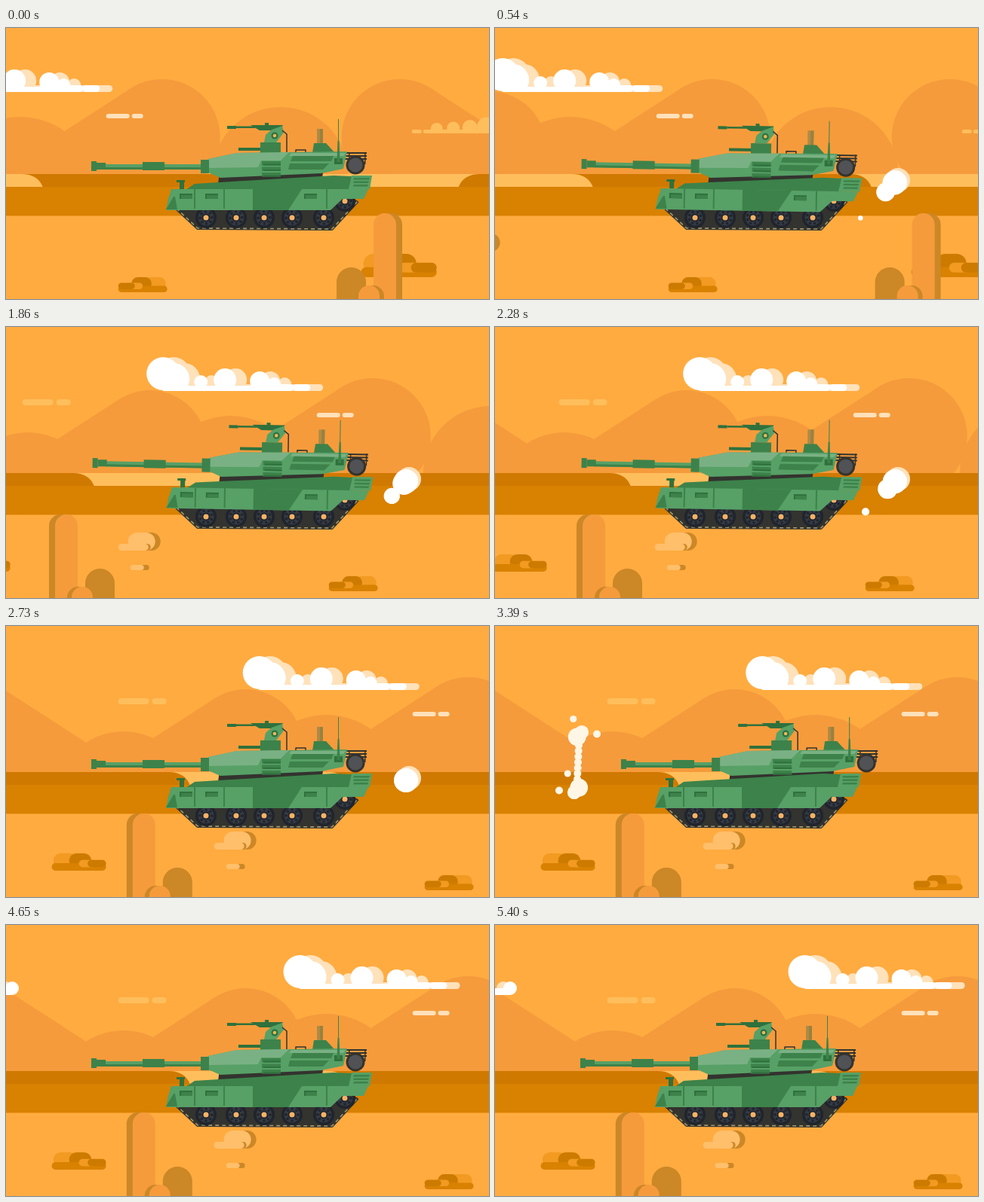
These frames come from a looping animation (640 px wide and 360 px high, 5.52 s). An HTML page with a canvas:

```html
<!DOCTYPE html>
<html lang="en">
<head>
<meta charset="utf-8">
<title>Desert tank</title>
<style>
html, body { margin: 0; width: 100%; height: 100%; overflow: hidden; background: #ffab40; }
canvas { display: block; width: 640px; height: 360px; }
</style>
</head>
<body>
<canvas id="stage" width="640" height="360"></canvas>
<script>
const ctx = document.getElementById('stage').getContext('2d');
const LOOP = 5520, STEP = 30, LAST = 5400, STOP = 2706;
const FIRST_SHOT = 3190, SHOT_GAP = 800, SHOTS = 3;

const C = {
  sky: '#ffab40', hill: '#f59b3c', band: '#d98100', strip: '#d07900', dune: '#ffbe5c',
  edge: '#cc8726', rock: '#f29a22', rockDark: '#cc7b00', rockBase: '#d98100', pale: '#ffbf6b',
  cream: '#ffe1ba', white: '#ffffff', smoke: '#fff6e6',
  light: '#7ab184', mid: '#57a066', green: '#3d824a', deep: '#2f713d',
  black: '#33332f', tyre: '#20242c', steel: '#353b44', hub: '#f4b266'
};

const clamp = v => Math.max(0, Math.min(1, v));
const smooth = v => { v = clamp(v); return v * v * (3 - 2 * v); };
const easeOut = v => 1 - Math.pow(1 - clamp(v), 3);

function circle(x, y, r, color) {
  if (r <= 0) return;
  ctx.fillStyle = color;
  ctx.beginPath();
  ctx.arc(x, y, r, 0, Math.PI * 2);
  ctx.fill();
}

function box(x, y, w, h, color) {
  ctx.fillStyle = color;
  ctx.fillRect(x, y, w, h);
}

function pill(x, y, w, h, color) {
  ctx.fillStyle = color;
  ctx.beginPath();
  ctx.roundRect(x, y, w, h, Math.min(w, h) / 2);
  ctx.fill();
}

function path(points) {
  ctx.beginPath();
  for (let i = 0; i < points.length; i += 2) ctx.lineTo(points[i], points[i + 1]);
}

function poly(color, ...points) {
  path(points);
  ctx.fillStyle = color;
  ctx.fill();
}

function line(color, width, ...points) {
  path(points);
  ctx.strokeStyle = color;
  ctx.lineWidth = width;
  ctx.stroke();
}

// Four-sided panel; the bottom corners lean sideways by l and r
function slab(color, x, y, w, h, l, r = l) {
  poly(color, x, y, x + w, y, x + w + r, y + h, x + l, y + h);
}

function shifted(dx, draw) {
  ctx.save();
  ctx.translate(dx, 0);
  draw();
  ctx.restore();
}

function clipAbove(y, draw) {
  ctx.save();
  ctx.beginPath();
  ctx.rect(-900, 0, 1800, y);
  ctx.clip();
  draw();
  ctx.restore();
}

// Round peak with one straight flank; side is -1 (left), 1 (right) or 0 (plain dome)
function hill(x, top, r, side) {
  circle(x, top + r, r, C.hill);
  if (!side) return;
  const a = 0.575, tx = x + side * r * Math.sin(a), ty = top + r * (1 - Math.cos(a));
  poly(C.hill, tx, ty, tx + side * (200 - ty) / Math.tan(a), 200, x, 200, x, top + r);
}

function hills() {
  hill(-457, 68, 77, 1);
  hill(-251, 140, 90, 0);
  hill(-89, 84, 75, -1);
  hill(18, 118, 100, 0);
  hill(206, 68, 77, -1);
  hill(363, 105, 90, 0);
  hill(521, 68, 77, 1);
}

// Flat mound with one rounded end at x, running away for w (negative: to the left)
function mound(x, w, color) {
  const s = Math.sign(w);
  ctx.fillStyle = color;
  ctx.beginPath();
  ctx.moveTo(x, 211);
  ctx.quadraticCurveTo(x + 7 * s, 194, x + 28 * s, 194);
  ctx.lineTo(x + w, 194);
  ctx.lineTo(x + w, 211);
  ctx.fill();
}

function dunes() {
  box(-700, 194, 1400, 55.5, C.band);
  box(-700, 194, 1400, 17, C.dune);
  mound(-163, -400, C.strip);
  mound(417, -400, C.strip);
  mound(48, -130, C.dune);
  mound(599, 200, C.strip);
}

function whiteCloud() {
  const puffs = [[100, 62, 22], [114, 69, 21], [150, 73, 9], [182, 70, 15], [228, 72, 13], [247, 76, 9]];
  pill(200, 76, 112, 9, C.cream);
  clipAbove(85, () => {
    for (const [x, y, r] of puffs) circle(x + 14, y, r, C.cream);
    for (const [x, y, r] of puffs) circle(x, y, r, C.white);
    box(100, 78, 150, 7, C.white);
  });
  pill(220, 76, 53, 9, C.white);
  pill(272, 76, 23, 9, C.white);
}

function peachCloud() {
  pill(537, 135, 13, 5, C.dune);
  pill(552, 135, 130, 5, C.dune);
  clipAbove(138, () => {
    for (let i = 0; i < 4; i++) circle(570 + 22 * i, 134 - i, 8 + i * i * 0.5, C.dune);
  });
}

function dash(x, y, w, w2, h, color) {
  pill(x, y, w, h, color);
  pill(x + w + h / 2, y, w2, h, color);
}

// Heap of boulders in a w by h frame, tall end on the left unless flipped
function heap(x, y, w, h, flip) {
  const part = (a, b, top, end, color) =>
    pill(x + w * (flip ? 1 - b : a), y + h * top, w * (b - a), h * (end - top), color);
  part(0.03, 0.48, 0, 0.85, C.rock);
  part(0.32, 0.73, 0, 0.85, C.rockDark);
  part(0, 1, 0.57, 1, C.rockBase);
  part(0.5, 0.82, 0.38, 0.8, C.rock);
  part(0.66, 1, 0.38, 0.8, C.rockDark);
}

function shadedStone(x, y, w, h) {
  pill(x + 7, y, w, h, C.edge);
  pill(x, y, w, h, C.pale);
}

function rocks() {
  heap(148, 331, 65, 20, true);
  heap(-346, 302, 72, 23);
  heap(470, 300, 100, 31);
  shadedStone(-118, 273, 36, 24);
  pill(-110, 288, 22, 9, C.edge);
  pill(-131, 288, 40, 9, C.pale);
  shadedStone(-115, 316, 18, 7);
}

// side tells where the shaded edge falls
function cactus(x, y, side) {
  ctx.save();
  ctx.translate(x, y);
  ctx.scale(side, 1);
  const stem = (sx, top, w, color) => pill(sx, top, w, 200, color);
  stem(-29, 318, 39, C.edge);
  stem(28, 246, 30, C.edge);
  stem(20, 246, 30, C.hill);
  stem(5, 342, 29, C.edge);
  stem(0, 342, 28, C.hill);
  ctx.restore();
}

function wheel(x, y, turn) {
  circle(x, y, 14, C.tyre);
  circle(x, y, 10.5, C.steel);
  for (let i = 0; i < 8; i++) {
    const a = turn + i * Math.PI / 4;
    circle(x + 8 * Math.cos(a), y + 8 * Math.sin(a), 1.8, C.tyre);
  }
  circle(x, y, 5.5, C.tyre);
  circle(x, y, 3.5, C.hub);
}

function tracks(dist) {
  const belt = [226, 240, 254, 266, 432, 267, 466, 230];
  poly(C.black, ...belt, 440, 215, 240, 230);
  ctx.lineJoin = 'round';
  line(C.black, 4, ...belt);
  ctx.setLineDash([5, 4]);
  ctx.lineDashOffset = dist;
  line('#a0986c', 1.6, ...belt);
  ctx.setLineDash([]);
  wheel(449, 230, -dist / 14);
  for (const x of [265, 305, 342, 379, 421]) wheel(x, 252, -dist / 14);
}

function hull() {
  poly(C.green, 238, 215, 250, 207, 282, 205, 434, 196, 458, 197, 458, 215);
  slab(C.mid, 458, 196, 27, 18, -4, -3);
  for (let i = 0; i < 3; i++) slab(C.green, 461, 199 + 4.5 * i, 21 - i, 2.5, -1);
  // tow hook
  box(226, 202, 11, 3, C.deep);
  box(230, 202, 6, 12, C.deep);
  // side skirts
  slab(C.mid, 219, 214, 261, 13, -4, -6);
  slab(C.mid, 215, 226, 232, 16, -3, -17);
  slab(C.green, 222, 224, 2, 17, -10, 3);
  slab(C.green, 327, 214, 65, 28, 0, -18);
  for (const x of [249, 288, 424]) box(x, 214, 2, 26, C.green);
  for (const x of [230, 264, 395]) {
    box(x, 220, 17, 7, C.deep);
    box(x + 2, 222, 15, 5, C.green);
  }
}

function barrel() {
  box(130, 181, 130, 7, C.mid);
  box(130, 185, 130, 3, C.green);
  box(181, 178, 29, 11, C.green);
  box(113, 177, 7, 13, C.green);
  box(120, 179, 12, 9, C.green);
}

function machineGun() {
  box(308, 159, 32, 4, C.deep);
  box(337, 152, 27, 14, C.green);
  box(293, 130, 12, 4, C.deep);
  box(305, 130.5, 25, 2.5, C.deep);
  slab(C.deep, 324, 129, 43, 7, 12, -4);
  box(343, 126, 5, 4, C.deep);
  poly(C.mid, 342, 152, 344, 142, 352, 135, 366, 130, 368, 139, 358, 152);
  circle(356, 143, 4.5, C.deep);
  circle(356, 143, 2.3, '#e9b95a');
  line(C.black, 1.5, 366, 136, 372, 141, 372, 165);
}

function turret(recoil) {
  shifted(recoil, barrel);
  // rear basket
  for (let y = 166; y < 178; y += 4) box(448, y - 1, 30, 2, C.black);
  for (const x of [454, 475]) box(x, 165, 1.5, 16, C.black);
  circle(463, 182, 12.5, C.black);
  circle(463, 182, 9.5, '#505256');
  // mast and hatch
  box(412, 134, 8, 22, '#b08a45');
  box(416, 134, 4, 22, '#98823f');
  slab(C.green, 408, 153, 16, 13, -2, 12);
  line(C.black, 1.5, 384, 165, 384, 162, 397, 162, 397, 165);
  machineGun();
  // body
  poly(C.mid, 268, 174, 306, 166, 452, 164, 447, 187, 418, 193, 284, 199, 268, 192);
  poly(C.light, 268, 174, 306, 166, 375, 165, 364, 176, 338, 176, 334, 185, 268, 186);
  slab(C.light, 378, 166, 72, 4, -3);
  slab(C.green, 380, 170, 54, 7, -3);
  slab(C.green, 376, 180, 52, 8, -2, -8);
  for (let y = 177; y < 194; y += 7.5) {
    box(339, y, 25, 5.5, C.green);
    box(341, y + 3.5, 23, 2, C.deep);
  }
  box(258, 175, 11, 18, C.green);
  // aerial
  box(435, 173, 11, 8, C.deep);
  line(C.green, 1, 440.5, 121, 440.5, 178);
  slab(C.green, 439.5, 150, 2, 28, -1, 1);
}

// Fast jump to 1, short hold, slow return
function kick(d, back) {
  return d < 110 ? easeOut(d / 60) : 1 - smooth((d - 110) / back);
}

function eachShot(t, use) {
  for (let i = 0; i < SHOTS; i++) {
    const age = t - FIRST_SHOT - i * SHOT_GAP;
    if (age > 0 && age < 335) use(age);
  }
}

function tank(t, dist) {
  const tilt = smooth(t / 300) * (1 - smooth((t - 2560) / 146));
  let slide = 0, recoil = 0;
  eachShot(t, age => {
    slide = 45 * kick(age, 225);
    recoil = 46 * kick(age, 190);
  });
  tracks(dist);
  ctx.save();
  ctx.translate(283, 275);
  ctx.rotate(tilt * 0.0175);
  ctx.translate(-283, -275);
  shifted(slide, () => slab(C.black, 283, 192, 137, 15, -2));
  hull();
  shifted(slide, () => turret(recoil));
  ctx.restore();
}

function exhaust(t) {
  const gap = 123, life = 370;
  const size = 16 * smooth((t - 150) / 200) * (1 - smooth((t - 2740) / 130));
  circle(534, 202, size, C.cream);
  circle(530, 205, size, C.white);
  for (let s = 28; s < 2400 && s <= t; s += gap) {
    const u = easeOut((t - s) / life);
    if (u < 1) circle(476 + 54 * u, 261 - 56 * u, 1 + 14.8 * u, C.white);
  }
}

function shell(age) {
  const x = 113 - 58 * Math.pow(age / 90, 4);
  box(x + 20, 177, 30, 8, '#ffd08a');
  box(x + 20, 181, 30, 4, '#f3b766');
  ctx.fillStyle = C.green;
  ctx.beginPath();
  ctx.moveTo(x, 181);
  ctx.quadraticCurveTo(x + 9, 177, x + 21, 177);
  ctx.lineTo(x + 21, 185);
  ctx.quadraticCurveTo(x + 9, 185, x, 181);
  ctx.fill();
}

function blast(age) {
  if (age < 150) shell(age);
  const spread = 1.3 * (1 - Math.exp(-age / 61.5));
  const size = clamp(age / 50) * (1 - smooth((age - 170) / 165));
  const puff = (x, y, r) => circle(110 + x * spread, 181 + y * spread, r * size, C.smoke);
  for (const end of [-1, 1]) {
    puff(end, 27 * end, 13);
    puff(-4 * end, 32 * end, 10);
    puff(-20 * end, 30 * end, 5.5);
  }
  for (let y = -18; y <= 18; y += 6) puff(Math.sin(y), y, 5.5);
  puff(-5, -46, 5);
  puff(-11, 12, 5);
}

function leftCloud() {
  circle(11, 84, 9, C.cream);
  circle(20, 84, 9, C.white);
  box(-60, 84, 80, 9, C.white);
}

function draw(t) {
  const drive = Math.min(t, STOP), dist = drive * 0.15 + 0.7;
  const drift = Math.max(0, t - STOP) * 0.028;
  box(0, 0, 640, 360, C.sky);
  shifted(dist, () => {
    clipAbove(196, hills);
    peachCloud();
    dash(132, 114, 31, 15, 6, C.cream);
    dash(-258, 96, 41, 19, 8, C.dune);
  });
  shifted(dist + drift - 171.5, whiteCloud);
  if (t > STOP) shifted((t - LAST) * 0.016, leftCloud);
  shifted(dist, () => {
    dunes();
    rocks();
  });
  shifted(drive * 0.1215, () => {
    cactus(467, 0, 1);
    cactus(-111, 3, -1);
  });
  exhaust(t);
  tank(t, dist);
  eachShot(t, blast);
}

function tick() {
  const t = performance.now() % LOOP;
  draw(Math.min(Math.floor(t / STEP) * STEP, LAST));
  requestAnimationFrame(tick);
}
tick();
</script>
</body>
</html>
```
